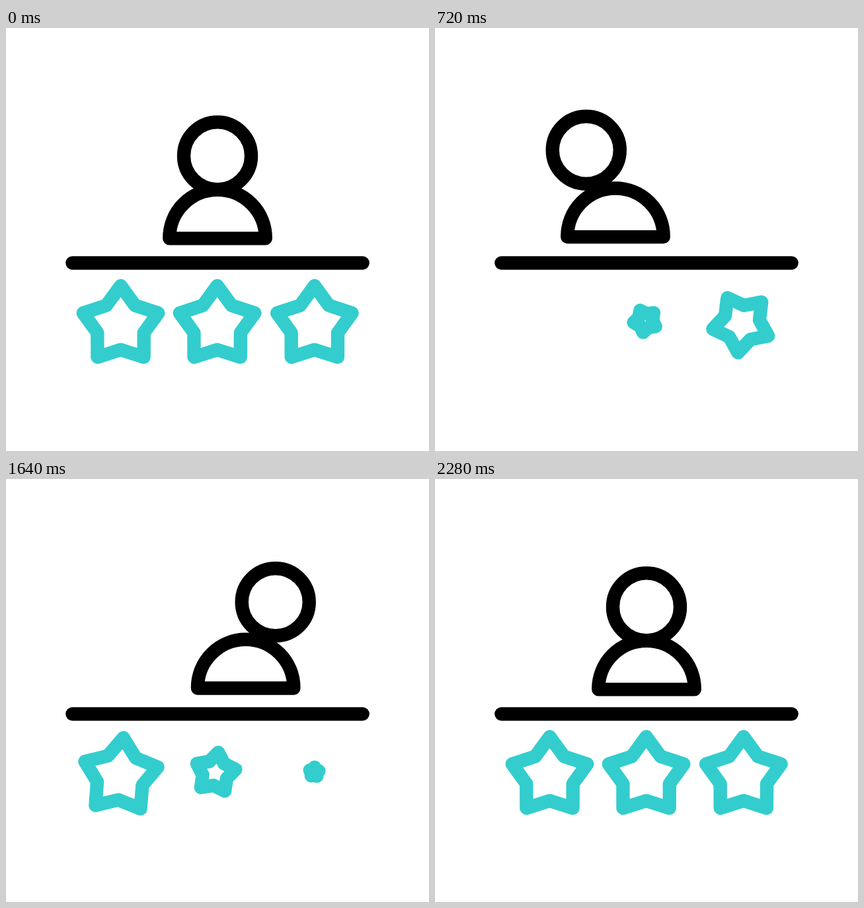
Animation, 640 px wide and 640 px high, one loop 2.4 s. Source, as an HTML page with a canvas:

```html
<!DOCTYPE html>
<html lang="en">
<head>
<meta charset="utf-8">
<title>Three star rating</title>
<style>
  html, body { margin: 0; width: 100%; height: 100%; overflow: hidden; background: #fff; }
  canvas { display: block; width: 100vmin; height: 100vmin; }
</style>
</head>
<body>
<canvas id="stage" width="640" height="640"></canvas>
<script>
const ctx = document.getElementById('stage').getContext('2d');
const LOOP = 2400, LAST = 2280, STEP = 20;
const STAR_X = [173.5, 319.6, 466.8], STAR_Y = 444, STAR_DELAY = 120;
const PEAK = 1.25, HIDDEN_BELOW = 0.12;

const clamp = v => Math.max(0, Math.min(1, v));
const smooth = (t, from, to) => {
  const u = clamp((t - from) / (to - from));
  return u * u * (3 - 2 * u);
};

// Swell, shrink away, pop back past full size, settle.
const starScale = t =>
  1 + (PEAK - 1) * smooth(t, 0, 265) - PEAK * smooth(t, 268, 754)
    + PEAK * smooth(t, 1308, 1785) - (PEAK - 1) * smooth(t, 1785, 2035);

// Centre -> left -> right -> centre, in the range -1..1.
const sway = (t, out, across, back) =>
  -smooth(t, ...out) + 2 * smooth(t, ...across) - smooth(t, ...back);

function drawStar(x, scale) {
  if (scale < HIDDEN_BELOW) return;
  const turn = (1 - scale) * (scale > 1 ? 177 : 168) * Math.PI / 180;
  const cos = Math.cos(turn) * scale, sin = Math.sin(turn) * scale;
  ctx.beginPath();
  for (let i = 0; i < 10; i++) {
    const r = i % 2 ? 37 : 59.7, a = i * Math.PI / 5;
    const px = r * Math.sin(a), py = 5.7 - r * Math.cos(a);
    ctx.lineTo(x + px * cos - py * sin, STAR_Y + px * sin + py * cos);
  }
  ctx.closePath();
  ctx.stroke();
}

function drawPerson(t) {
  const bodyX = 320 + 47 * sway(t, [275, 700], [905, 1355], [1560, 1985]);
  const headX = bodyX + 45.5 * sway(t, [270, 770], [970, 1290], [1620, 1975]);
  const lift = smooth(t, 270, 800) - smooth(t, 1490, 1990);

  ctx.beginPath();
  ctx.arc(headX, 193.4 - 9.2 * lift, 51, 0, Math.PI * 2);
  ctx.closePath();
  ctx.stroke();

  const baseY = 318.4 - 2.4 * lift;
  ctx.beginPath();
  ctx.moveTo(bodyX - 72.7, baseY);
  ctx.arc(bodyX, baseY - 1, 72.7, Math.PI, 0);
  ctx.lineTo(bodyX + 72.7, baseY);
  ctx.closePath();
  ctx.stroke();
}

function draw(t) {
  ctx.fillStyle = '#fff';
  ctx.fillRect(0, 0, 640, 640);
  ctx.lineJoin = ctx.lineCap = 'round';
  ctx.lineWidth = 20.4;

  ctx.strokeStyle = '#33cdce';
  STAR_X.forEach((x, i) => drawStar(x, starScale(t - i * STAR_DELAY)));

  ctx.strokeStyle = '#000';
  drawPerson(t);
  ctx.beginPath();
  ctx.moveTo(100.4, 355.5);
  ctx.lineTo(539.6, 355.5);
  ctx.stroke();
}

const start = performance.now();
function tick() {
  const t = (performance.now() - start) % LOOP;
  draw(Math.min(LAST, Math.floor(t / STEP) * STEP));
  requestAnimationFrame(tick);
}
tick();
</script>
</body>
</html>
```
